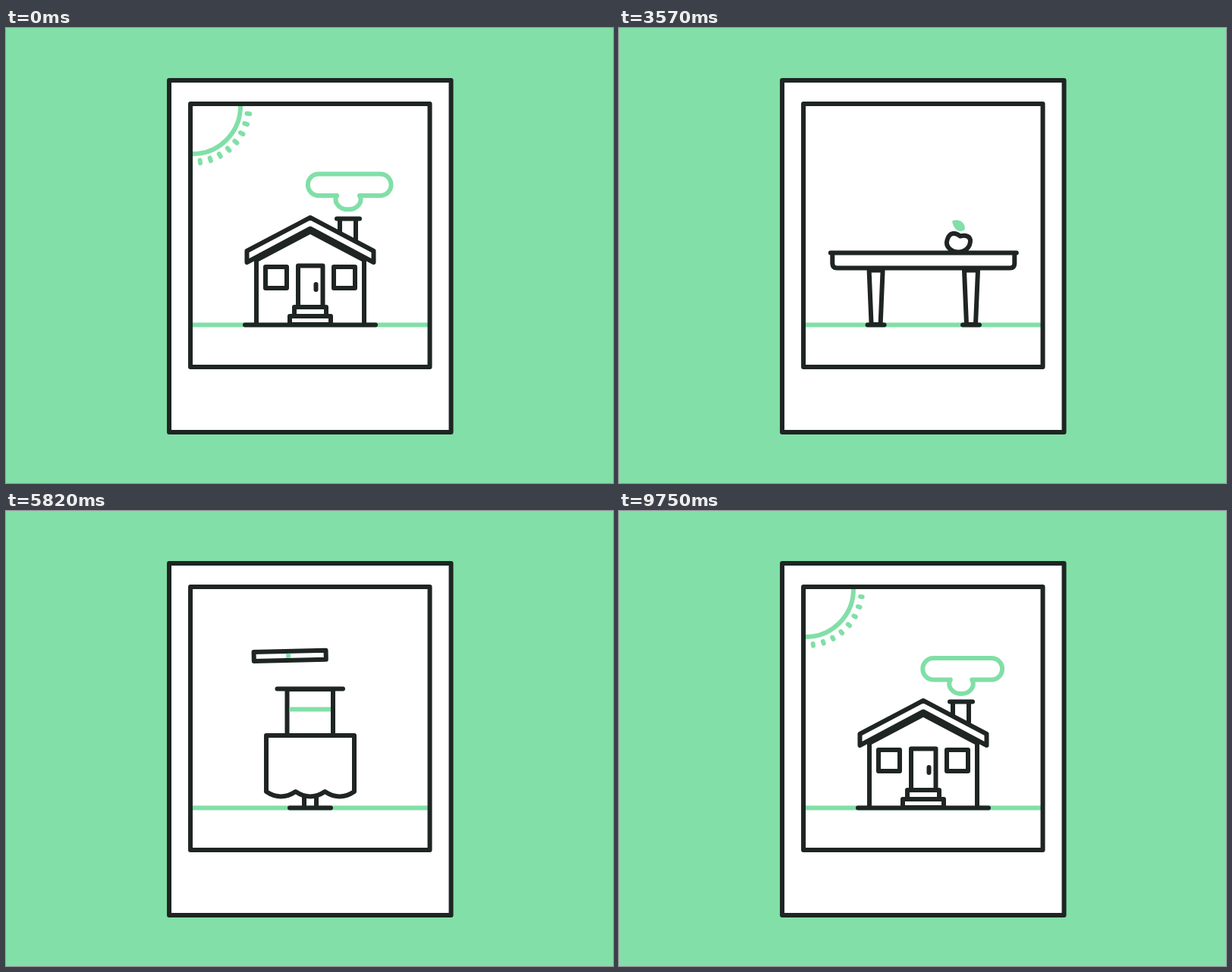
An HTML page for the animation above (9.78 s loop, 800 px wide and 600 px high).

```html
<!DOCTYPE html>
<html lang="en">
<head>
<meta charset="utf-8">
<title>Picture frame</title>
<style>
html, body { margin: 0; width: 100%; height: 100%; overflow: hidden; background: #81dfa7; }
svg { display: block; width: 100vw; height: 100vh; }
svg * { vector-effect: non-scaling-stroke; }
.ink, .green { fill: none; stroke: #1e2523; stroke-width: 6; stroke-linecap: round; stroke-linejoin: round; }
.green { stroke: #81dfa7; }
.butt { stroke-linecap: butt; }
.paper { fill: #fff; }
.leaf { fill: #81dfa7; }
</style>
</head>
<body>
<svg viewBox="0 0 800 600">
  <defs><clipPath id="window"><rect id="hole"/></clipPath></defs>
  <rect id="outer" class="ink paper"/>
  <g clip-path="url(#window)">
    <path id="ground" class="green"/>
    <g id="sun" class="green">
      <circle cx="246" cy="103" r="63"/>
      <path id="rays"/>
    </g>
    <path id="cloud" class="green paper"/>
    <g id="house" class="ink">
      <path id="chimney" class="paper" d="M440 285V252M461 285V252M436 251.500H466"/>
      <g id="walls">
        <path class="paper" d="M330 391V304L401 266 472 304V391"/>
        <path d="M315 391.500H487"/>
      </g>
      <g id="roof">
        <path class="paper" d="M317.500 294L401 250 484.500 294V309L401 264.500 317.500 309Z"/>
        <path d="M330 306L401 268.500 472 306"/>
      </g>
      <path id="panes" d="M342 315h28v28h-28ZM432 315h28v28h-28Z"/>
      <g id="door">
        <path class="paper" d="M385 313.500H417.500V368H385ZM380 368H422V380H380ZM374 380H428V391H374Z"/>
        <path d="M408.500 338V345"/>
      </g>
    </g>
    <path id="board" class="green" d="M295 301V168H507V301M279 301.500H522"/>
    <path id="desk" class="ink paper"/>
    <g class="ink">
      <path id="book0" class="paper" d="M325 274h60v12h-60Z"/>
      <path id="book1" class="paper" d="M335 262.500h60v11.500h-60Z"/>
      <path id="book2" class="paper" d="M320 250.500h59v12h-59Z"/>
    </g>
    <g id="apple">
      <path class="ink paper" d="M2 -22C-3 -27 -12 -28 -15 -17C-18 -7 -8 -1 0 -1C8 -1 16 -7 15.500 -17C14 -24 6 -23 2 -22Z"/>
      <path id="leaf" class="leaf" d="M0 0C2 -8 12 -9 20 -1C15 8 4 8 0 0Z"/>
    </g>
    <g id="hat" class="ink">
      <path class="paper" d="M370.500 295V235H431V295"/>
      <path class="green butt" d="M373.500 261.500H428"/>
      <path d="M357.500 234.500H444"/>
    </g>
    <g id="table" class="ink">
      <path d="M393 372V391M409 372V391M374 391.500H428"/>
      <path id="cloth" class="paper"/>
    </g>
    <g id="wand" class="ink">
      <path class="paper" d="M-47.500 -6H47.500V6H-47.500Z"/>
      <path class="green butt" d="M-2 -3V3"/>
    </g>
  </g>
  <rect id="inner" class="ink"/>
</svg>
<script>
const LOOP = 9780;
const CENTER = 400.8;
const $ = id => document.getElementById(id);
const mix = (a, b, p) => a + (b - a) * p;
const progress = (t, start, end) => Math.max(0, Math.min(1, (t - start) / (end - start)));

function smooth(t, start, end) {
  const p = progress(t, start, end);
  return p * p * (3 - 2 * p);
}

// Passes its goal by a little, then settles.
function back(t, start, end) {
  const p = progress(t, start, end) - 1;
  return 1 + 2.2 * p ** 3 + 1.2 * p ** 2;
}

// Size of a part that grows in at start and shrinks away at end.
const pop = (t, start, end) => back(t, start, start + 300) * (1 - smooth(t, end, end + 250));

function place(id, size, transform) {
  $(id).style.display = size < .02 ? 'none' : '';
  $(id).setAttribute('transform', transform);
}

function scale(id, x, y, sx, sy = sx) {
  place(id, Math.min(sx, sy), `translate(${x} ${y}) scale(${sx} ${sy}) translate(${-x} ${-y})`);
}

function box(id, y, width, height) {
  const values = { x: CENTER - width / 2, y: y - height / 2, width, height };
  for (const name in values) $(id).setAttribute(name, values[name]);
}

function drawFrame(t) {
  const wide = back(t, 3930, 4080) - smooth(t, 4500, 4690);
  const zoom = .265 * smooth(t, 4500, 4720) * (1 - smooth(t, 4720, 5010));
  const innerZoom = 1 - .37 * zoom;
  box('outer', 301, mix(371.5, 494, wide) * (1 + zoom), mix(464, 340, wide) * (1 + zoom));
  for (const id of ['inner', 'hole']) {
    box(id, mix(273.5, 300, wide) + 12 * zoom, mix(315.5, 376, wide) * innerZoom, mix(347, 294.5, wide) * innerZoom);
  }
  const half = 200 * (1 - smooth(t, 4350, 4600) + smooth(t, 5000, 5250));
  $('ground').setAttribute('d', `M${CENTER - half} 391.5H${CENTER + half}`);
  $('ground').style.display = half < 1 ? 'none' : '';
}

function drawRays(t) {
  const length = 5.5 * smooth(t, 9650, 9850) * (1 - smooth(t, 10280, 10480));
  let d = '';
  for (let i = 0; length > .1 && i < 8; i++) {
    const angle = (7.8 + 10.65 * i) * Math.PI / 180;
    const point = r => `${246 + r * Math.cos(angle)} ${103 + r * Math.sin(angle)}`;
    d += `M${point(74 - length / 2)}L${point(74 + length / 2)}`;
  }
  $('rays').setAttribute('d', d);
}

function drawCloud(t) {
  const w = 88 * smooth(t, 8860, 10440), r = .3 * w, x = 451, end = r - 1.5;
  const top = 194 - (t - 9750) / 20, bottom = top + 28.5;
  const left = x + 1.7 - w + 14.25, right = x + 1.7 + w - 14.25;
  $('cloud').setAttribute('d', `M${x - end} ${bottom}H${left}a14.25 14.25 0 0 1 0 -28.5` +
    `H${right}a14.25 14.25 0 0 1 0 28.5H${x + end}A${r} 13 0 1 1 ${x - end} ${bottom}`);
  scale('cloud', x, bottom, pop(t, 9400, 10820));
}

// The house stands across the loop point, so its clock runs on past the end.
function drawHouse(t) {
  if (t < LOOP / 2) t += LOOP;
  const gone = 10730;
  drawRays(t);
  drawCloud(t);
  scale('sun', 246, 103, pop(t, 8550, 10500));
  scale('house', 401, 391, 1, 1 - smooth(t, gone, gone + 250));
  scale('walls', 401, 391, pop(t, 8150, gone + 250));
  scale('roof', 401, 309, pop(t, 8400, gone + 250));
  scale('chimney', 450, 285, 1, pop(t, 8620, gone + 250));
  scale('door', 401, 391, 1, pop(t, 8780, gone + 250));
  scale('panes', 401, 329, pop(t, 8950, gone + 250));
}

function drawDesk(t) {
  const wide = back(t, 2680, 3000);
  const top = mix(287, 296.5, wide), half = mix(85, 122.5, wide);
  const body = mix(72.5, 120, wide), leg = mix(50.5, 62.7, wide);
  const legs = [401.3 - leg, 401.3 + leg].map(x =>
    `M${x - 9} 319.5H${x + 9}L${x + 6} 391H${x - 6}ZM${x - 11} 391.5H${x + 11}`).join('');
  $('desk').setAttribute('d', `${legs}M${401.3 - body} ${top}V310.5q0 6 6 6H${395.3 + body}q6 0 6 -6V${top}` +
    `M${401.3 - half} ${top}H${401.3 + half}`);
  scale('desk', 401, 391, pop(t, 1180, 4300));
  scale('board', 401, 302, pop(t, 1950, 2650));

  for (let i = 0; i < 3; i++) {
    const start = 1450 + 120 * i;
    const size = pop(t, start, 2780 - 70 * i);
    const drop = 110 * (smooth(t, start, start + 220) - 1);
    place('book' + i, size, `translate(${357 * (1 - size)} ${drop + 287 * (1 - size)}) scale(${size})`);
  }

  const size = pop(t, 1600, 4200);
  const x = 500 - 38.5 * smooth(t, 1600, 1900) - 14 * smooth(t, 2700, 3050);
  const y = top - 90 * (1 - smooth(t, 1600, 1850));
  const turn = smooth(t, 2800, 3100);
  place('apple', size, `translate(${x} ${y}) scale(${size})`);
  place('leaf', 1, `translate(${mix(1, 8, turn)} -30.5) rotate(${mix(-29, -142, turn)})`);
}

function drawMagic(t) {
  const age = Math.max(0, t - 5150);
  const hem = 367 - 28 * Math.exp(-age / 300) * Math.sin(age / 60);
  const scallop = 'q-19.33 13 -38.67 0';
  $('cloth').setAttribute('d', `M343 ${hem}V296H459V${hem}${scallop.repeat(3)}Z`);
  scale('table', 401, 391, pop(t, 5100, 7900));
  scale('hat', 401, 295, 1, pop(t, 5380, 7400));

  const size = smooth(t, 5560, 5760) * (1 - smooth(t, 7150, 7370));
  const path = smooth(t, 5550, 6080);
  const wave = Math.sin(Math.max(0, t - 6080) / 65) * (1 - smooth(t, 6500, 6900));
  place('wand', size, `translate(${mix(262, 479, path)} ${mix(210, 173, path) + 8 * wave}) ` +
    `rotate(${mix(-24, 20, path) + 15 * wave}) scale(${size})`);
}

const began = performance.now();
function render() {
  const t = (performance.now() - began) % LOOP;
  drawFrame(t);
  drawHouse(t);
  drawDesk(t);
  drawMagic(t);
  requestAnimationFrame(render);
}
render();
</script>
</body>
</html>
```
